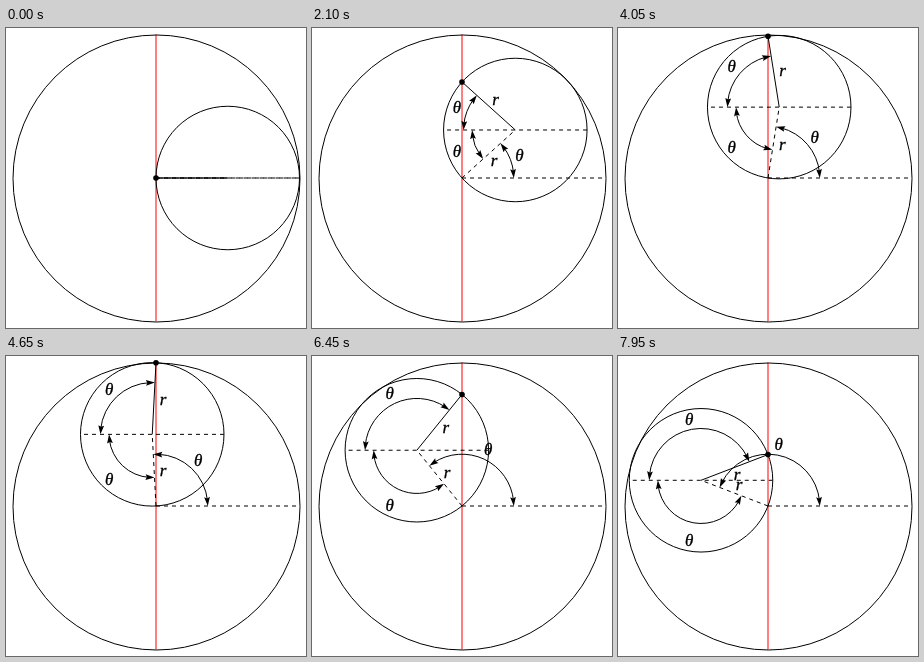
An HTML page that plays this animation: 300x300 px, repeating every 8 s.

```html
<!DOCTYPE html>
<html lang="en">
<head>
<meta charset="utf-8">
<title>Circle rolling inside a circle</title>
<style>
  html, body { margin: 0; width: 100%; height: 100%; overflow: hidden; background: #fff; }
  svg { display: block; width: 100%; height: 100%; }
  .line { fill: none; stroke: #000; stroke-width: 1; }
  .dash { stroke-dasharray: 4 4; }
  .red { stroke: #f00; }
  text {
    font: italic 17px "Liberation Serif", "Times New Roman", serif;
    text-anchor: middle; stroke: #000; stroke-width: 0.3;
  }
</style>
</head>
<body>
<svg viewBox="0 0 300 300">
  <path class="line red" d="M150 6.5V293.5"/>
  <circle class="line" cx="150.5" cy="150.5" r="143.5"/>
  <path class="line dash" d="M150 150H293.5"/>
  <circle id="wheel" class="line" r="71.75"/>
  <path id="diameter" class="line dash"/>
  <path id="arm" class="line dash"/>
  <path id="spoke" class="line"/>
  <g id="marks">
    <path id="arcs" class="line"/>
    <path id="heads"/>
    <text id="theta1">θ</text>
    <text id="theta2">θ</text>
    <text id="theta3">θ</text>
    <text id="r1">r</text>
    <text id="r2">r</text>
  </g>
  <circle id="dot" r="2.8"/>
</svg>
<script>
const LOOP = 8000, STEP = 150, TURN = Math.PI / 60;
const HUB = { x: 150, y: 150 }, R = 71.75;
const WIDE = 51.8, NARROW = 43.2, LABEL = 62;
const HEAD = 9, NOTCH = 7.6, HALF = 2.9;
const LEAN = 0.236, MARKS_FROM = 5.5 * TURN;

const $ = id => document.getElementById(id);
const set = (id, attrs) => {
  for (const k in attrs) $(id).setAttribute(k, attrs[k]);
};
// Angles run counter-clockwise from the right.
const polar = (c, r, a) => ({ x: c.x + r * Math.cos(a), y: c.y - r * Math.sin(a) });
const pt = p => p.x.toFixed(3) + ' ' + p.y.toFixed(3);
const segment = (a, b) => `M${pt(a)}L${pt(b)}`;

function arc(c, r, from, to) {
  const sweep = to > from ? 0 : 1;
  return `M${pt(polar(c, r, from))}A${r} ${r} 0 0 ${sweep} ${pt(polar(c, r, to))}`;
}

// Arrowhead with its tip at angle a; dir points along the arc, away from the tip.
function head(c, r, a, dir) {
  const tip = polar(c, r, a), back = polar(c, r, a + dir * HEAD / r);
  const len = Math.hypot(back.x - tip.x, back.y - tip.y);
  const ux = (back.x - tip.x) / len, uy = (back.y - tip.y) / len;
  const at = (d, s) => pt({ x: tip.x + ux * d - uy * s, y: tip.y + uy * d + ux * s });
  return `M${pt(tip)}L${at(HEAD, HALF)}L${at(NOTCH, 0)}L${at(HEAD, -HALF)}Z`;
}

function label(id, p, dx, dy) {
  set(id, { x: p.x + dx, y: p.y + dy });
}

function draw(q) {
  const mid = polar(HUB, R, q);
  const dot = { x: HUB.x, y: HUB.y - 2 * R * Math.sin(q) };
  const up = Math.PI - q, down = Math.PI + q;

  set('wheel', { cx: mid.x, cy: mid.y });
  set('dot', { cx: dot.x, cy: dot.y });
  set('diameter', { d: segment(polar(mid, R, 0), polar(mid, R, Math.PI)) });
  set('arm', { d: segment(HUB, mid) });
  set('spoke', { d: segment(mid, dot) });

  const shown = q > MARKS_FROM;
  $('marks').style.display = shown ? '' : 'none';
  if (!shown) return;

  const spans = [
    [HUB, WIDE, 0, q],
    [mid, WIDE, up, Math.PI],
    [mid, NARROW, Math.PI, down]
  ];
  // Shafts stop inside the heads so the tips stay sharp.
  set('arcs', { d: spans.map(([c, r, a, b]) => arc(c, r, a + 5 / r, b - 5 / r)).join('') });
  set('heads', { d: spans.map(([c, r, a, b]) => head(c, r, a, 1) + head(c, r, b, -1)).join('') });

  label('theta1', polar(HUB, LABEL, q / 2), -0.5, 5.2);
  label('theta2', polar(mid, LABEL, Math.PI - q / 2), -0.5, 5.2);
  label('theta3', polar(mid, LABEL, Math.PI + q / 2), -0.5, 5.2);
  label('r1', polar(HUB, R / 2, q - LEAN), 0.5, 4.8);
  label('r2', polar(mid, R / 2, up - LEAN), 0.5, 4.8);
}

function tick() {
  draw(Math.floor(performance.now() % LOOP / STEP) * TURN);
  requestAnimationFrame(tick);
}
tick();
</script>
</body>
</html>
```
